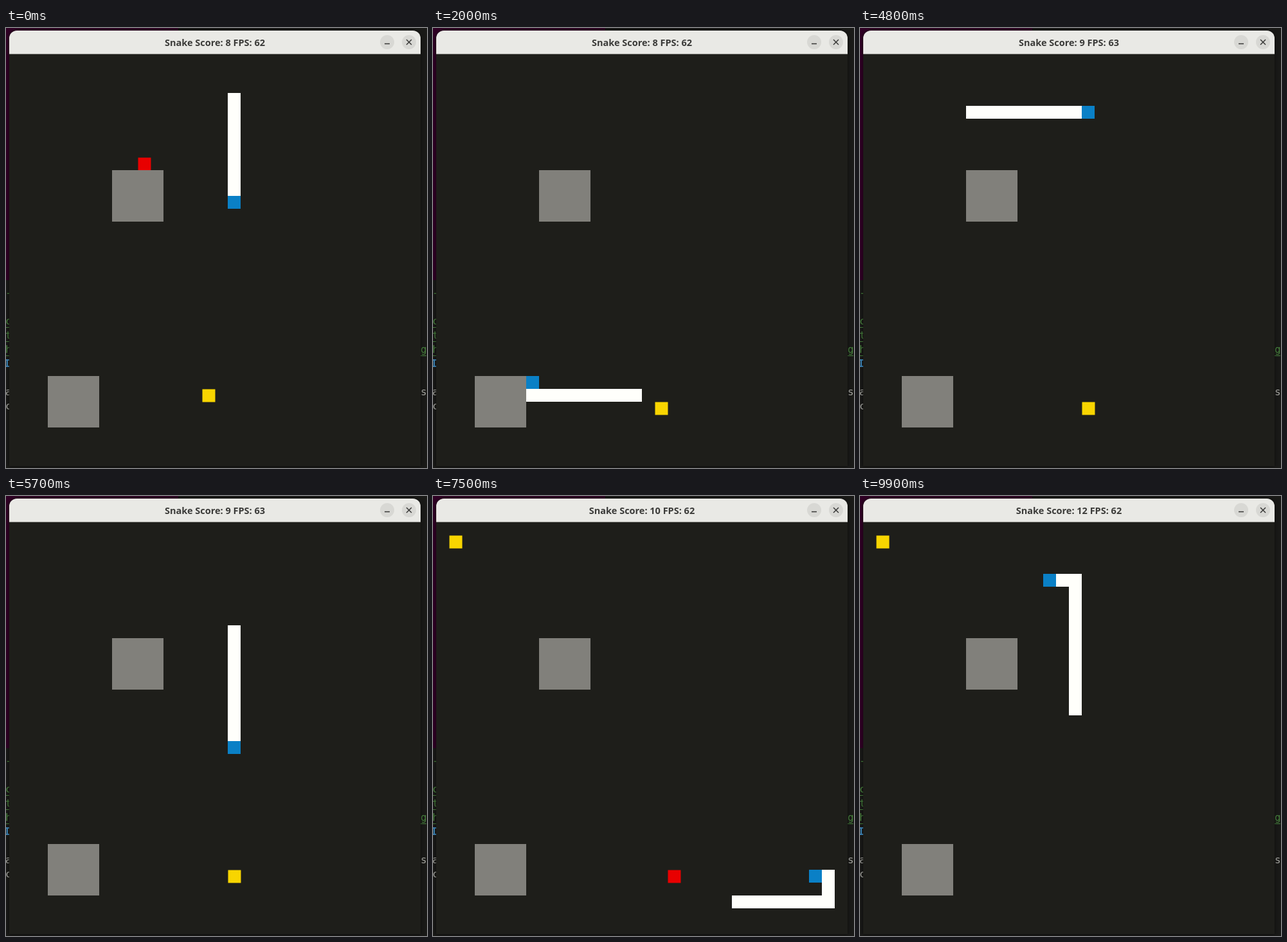
An HTML page with a canvas that plays this animation: 655 by 684 pixels, repeating every 10000 ms.

```html
<!DOCTYPE html>
<html lang="en">
<head>
<meta charset="utf-8">
<title>Snake</title>
<style>
html, body { margin: 0; width: 655px; height: 684px; overflow: hidden; background: #191917; }
canvas { display: block; }
</style>
</head>
<body>
<canvas id="stage" width="655" height="684"></canvas>
<script>
const g = document.getElementById('stage').getContext('2d');
const CELL = 20, LEFT = 5, TOP = 41, LOOP = 10000, STEP = 100;
const RED = '#e80000', YELLOW = '#f8d500', BLUE = '#0a80c6', WHITE = '#fffffb', GREY = '#81807b';

// The route as turns; the head begins START cells along it.
const START = 8;
const DIRS = { U: [0, -1], D: [0, 1], L: [-1, 0], R: [1, 0] };
const route = [[17, 3]];
for (const leg of 'D23 L10 U10 L6 U12 R16 D25 R13 U2 L14 U23 L2'.split(' ')) {
  const [dx, dy] = DIRS[leg[0]];
  for (let i = +leg.slice(1); i > 0; i--) {
    const [x, y] = route[route.length - 1];
    route.push([x + dx, y + dy]);
  }
}

// Food lies on the route: the move that eats it and the cells it adds.
const meal = (at, grow) => ({ at, grow, pos: route[START + at] });
const first = meal(17, 1), second = meal(92, 1), bonus = meal(121, 2);

// Key points of the pace: ms and moves made.
const pace = [[0, 0], [2000, 26], [4800, 69], [6600, 95], [7500, 110], [9900, 148]];

function movesAt(t) {
  const i = Math.max(1, pace.findIndex(p => p[0] >= t));
  const [t0, n0] = pace[i - 1], [t1, n1] = pace[i];
  return Math.round(n0 + (n1 - n0) * (t - t0) / (t1 - t0));
}

// The snake grows once its tail reaches the place of the meal.
function lengthAt(n) {
  return [first, second, bonus].reduce((len, { at, grow }) =>
    len + Math.min(grow, Math.max(0, n - at - len + 1)), START + 1);
}

function box(color, x, y, w, h) {
  g.fillStyle = color;
  g.fillRect(x, y, w, h);
}

function cell(color, [x, y], size = CELL) {
  box(color, LEFT + x * CELL, TOP + y * CELL, size, size);
}

function food(color, [x, y]) {
  cell(color, [x + .025, y + .025]);
}

function label(text, color, x, y, font) {
  g.font = font;
  g.fillStyle = color;
  g.fillText(text, x, y);
}

function panel(color, height) {
  g.fillStyle = color;
  g.beginPath();
  g.roundRect(LEFT, 4, 640, height, [12, 12, 0, 0]);
  g.fill();
}

function line(x0, y0, x1, y1) {
  g.beginPath();
  g.moveTo(x0, y0);
  g.lineTo(x1, y1);
  g.stroke();
}

// Terminal text showing beside the window.
function edgeText(chars, x, underlined) {
  [...chars].forEach((c, i) => {
    const y = 417 + 22 * i, bold = c === 'I';
    const color = bold ? '#3d83b5' : i < 5 ? '#467f3c' : '#a3a39e';
    label(c, color, bold ? x - 2 : x, y, (bold ? 'bold ' : '') + '16px "DejaVu Sans Mono", monospace');
    if (underlined.includes(c) && i < 5) box(color, x, y + 4, 9, 1);
  });
}

function desktop() {
  box('#191917', 0, 0, 655, 684);
  box('#2f0024', 0, 0, 268, 392);
  g.textAlign = 'left';
  edgeText('- cthI ac', -1, 'cth');
  edgeText('    g  s', 645, 'g');
}

function windowFrame(title) {
  g.save();
  g.shadowColor = 'rgba(0,0,0,.55)';
  g.shadowBlur = 5;
  panel('#1e1e1a', 677);
  g.restore();
  panel('#e9e9e5', 36.5);

  g.textAlign = 'center';
  label(title, '#3b3b39', 325, 28, 'bold 14.5px "Open Sans", "Noto Sans", sans-serif');
  g.fillStyle = '#d8d8d4';
  for (const x of [593, 627]) {
    g.beginPath();
    g.arc(x, 22, 11, 0, 7);
    g.fill();
  }
  g.strokeStyle = '#363634';
  g.lineWidth = 1.5;
  line(589, 24.5, 597, 24.5);
  line(623, 18, 631, 26);
  line(631, 18, 623, 26);
}

function draw(t) {
  const n = movesAt(t), head = n + START;
  const score = lengthAt(n - 1) - 1;
  const fps = t >= 4000 && t < 6000 ? 63 : 62;

  desktop();
  windowFrame(`Snake Score: ${score} FPS: ${fps}`);

  if (n < first.at) food(RED, [10, 8]);
  if (n >= second.at && n < bonus.at) food(RED, bonus.pos);
  food(YELLOW, n < first.at ? first.pos : n < second.at ? second.pos : [1, 1]);
  cell(GREY, [8, 9], 4 * CELL);
  cell(GREY, [3, 25], 4 * CELL);

  route.slice(head - lengthAt(n) + 1, head).forEach(p => cell(WHITE, p));
  cell(BLUE, route[head]);
}

function tick() {
  draw(Math.floor(performance.now() % LOOP / STEP) * STEP);
  requestAnimationFrame(tick);
}
tick();
</script>
</body>
</html>
```
